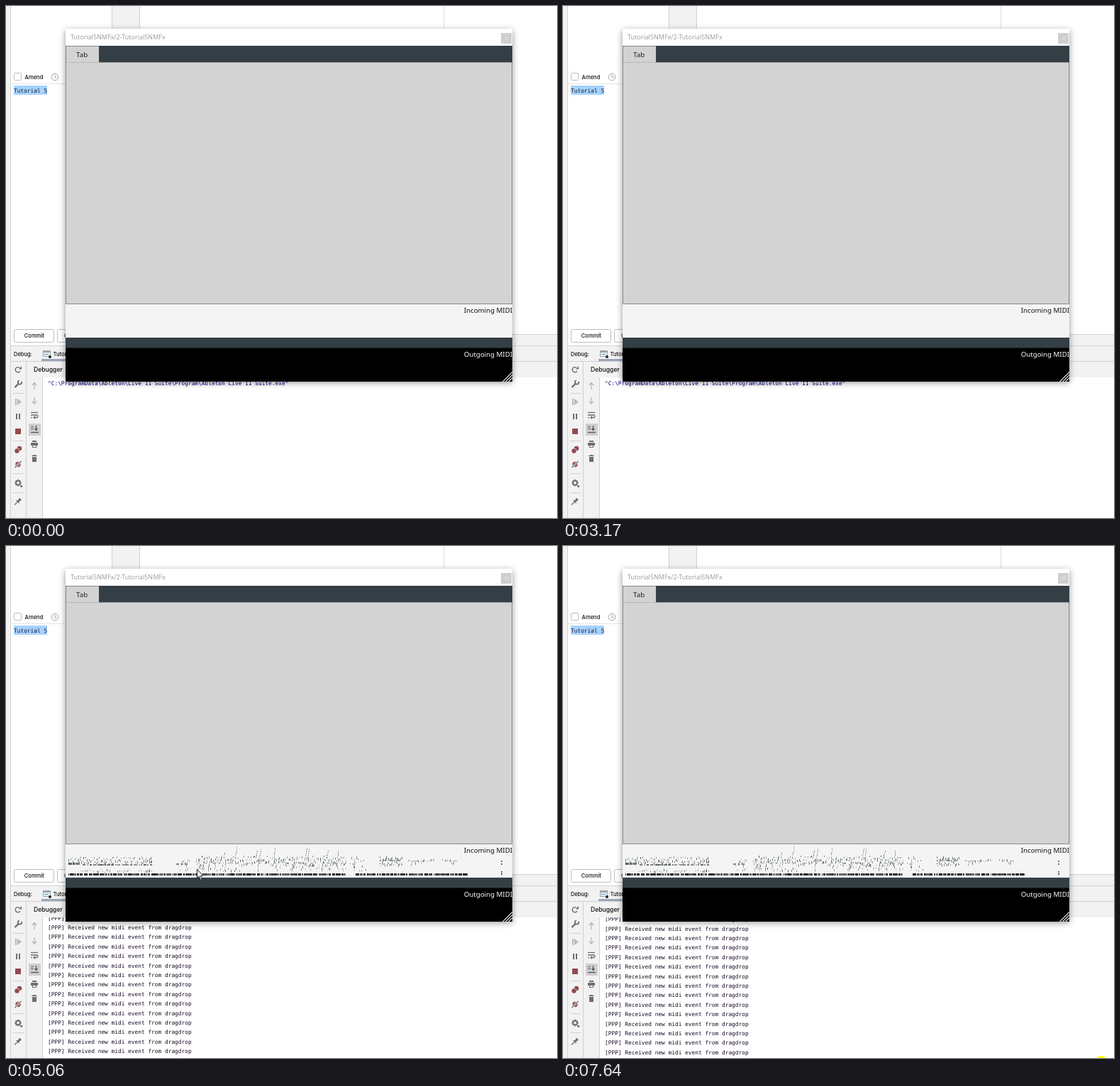
Animation, 777 px wide and 721 px high, one loop 7710 ms. Source, as an HTML page with a canvas:

```html
<!DOCTYPE html>
<html lang="en">
<head>
<meta charset="utf-8">
<title>MIDI drag and drop</title>
<style>
html, body { margin: 0; width: 100%; height: 100%; overflow: hidden; background: #fff; }
canvas { display: block; }
</style>
</head>
<body>
<canvas id="stage" width="777" height="721"></canvas>
<script>
const ctx = document.getElementById('stage').getContext('2d');
const W = 777, H = 721, LOOP = 7710;
const UI = 'Inter, sans-serif', MONO = '"DejaVu Sans Mono", monospace';
const PANEL = '#f2f2f2', RULE = '#d1d1d1', SLATE = '#333f44', ICON = '#6e6e6e', RED = '#914b4d';

function box(x, y, w, h, fill) {
  ctx.fillStyle = fill;
  ctx.fillRect(x, y, w, h);
}
function text(s, x, y, size, family, fill = '#111', align = 'left') {
  ctx.font = (family === UI ? '500 ' : '') + size + 'px ' + family;
  ctx.textAlign = align;
  ctx.fillStyle = fill;
  ctx.fillText(s, x, y);
}
// Open or closed polyline from a flat list of coordinates
function trace(p, close) {
  ctx.beginPath();
  for (let i = 0; i < p.length; i += 2) ctx.lineTo(p[i], p[i + 1]);
  if (close) ctx.closePath();
}
function line(p, color = ICON, width = 1.3) {
  trace(p);
  ctx.strokeStyle = color;
  ctx.lineWidth = width;
  ctx.stroke();
}
function poly(p, color) {
  trace(p, true);
  ctx.fillStyle = color;
  ctx.fill();
}
function disc(x, y, r, color) {
  ctx.beginPath();
  ctx.arc(x, y, r, 0, 7);
  ctx.fillStyle = color;
  ctx.fill();
}
function ring(x, y, r, color = ICON, width = 1.3, a = 0, b = Math.PI * 2) {
  ctx.beginPath();
  ctx.arc(x, y, r, a, b);
  ctx.strokeStyle = color;
  ctx.lineWidth = width;
  ctx.stroke();
}
function button(x, y, w, h, r) {
  ctx.beginPath();
  ctx.roundRect(x + .5, y + .5, w, h, r);
  ctx.fillStyle = '#fff';
  ctx.fill();
  ctx.strokeStyle = '#bdbdbd';
  ctx.lineWidth = 1;
  ctx.stroke();
}

function drawEditor() {
  box(0, 0, W, H, '#fff');
  box(0, 0, 6, H, PANEL);
  box(6, 0, 1, H, RULE);
  box(149, 0, 40, 60, PANEL);
  box(149, 0, 1, 60, RULE);
  box(188, 0, 1, 60, RULE);
  box(617, 0, 1, 60, '#dedede');

  button(11, 94, 10, 10, 1);
  text('Amend', 26.5, 102.7, 7.6, UI);
  ring(69, 100, 4.8, '#a3a3a3', 1);
  line([69, 97, 69, 100.5, 71.5, 100.5], '#a3a3a3', 1);
  box(7, 109, 90, 1, '#e4e4e4');
  box(11, 112, 47, 13, '#a6d2ff');
  text('Tutorial 5', 11, 122, 7.84, MONO, '#1a1a2c');
  button(11, 455, 56, 18, 2);
  text('Commit', 25.8, 467.2, 7.6, UI);
  button(72, 455, 56, 18, 2);
  text('C', 82, 467.2, 7.6, UI);

  box(700, 462, 77, 16, PANEL);
  box(700, 462, 77, 1, RULE);
  box(7, 478, 770, 45, PANEL);
  box(7, 478, 770, 1, RULE);
  box(7, 500, 770, 1, RULE);
  text('Debug:', 11, 492.7, 7.5, UI);
  box(50, 497, 70, 3, '#9ca7b8');
  box(52, 485, 11, 9, '#9aa7b0');
  box(53, 488, 9, 5, '#e4eef4');
  line([54, 490.5, 60, 490.5], '#6ba4c4', 1);
  disc(62, 494, 2, '#222');
  text('Tutorial5NMFx', 66.5, 492.7, 7.6, UI);

  box(7, 501, 45, 220, PANEL);
  text('Debugger', 39, 515.3, 8.6, UI);
  box(28, 501, 1, 220, RULE);
  box(51, 523, 1, 198, RULE);
  for (const y of [545, 612, 658, 685]) box(10, y, 15, 1, RULE);
  drawIcons();
}

function drawIcons() {
  // Run controls
  ring(16.8, 512.2, 3.6, ICON, 1.4, .6, 5.4);
  poly([18, 511.5, 22, 511.5, 22, 507], ICON);
  line([12.5, 537, 18, 531.5], ICON, 2.4);
  ring(19.5, 530, 2.7, ICON, 1.8, -.4, 4.4);
  box(13, 553, 2, 9, '#b9b9b9');
  poly([16, 553, 22, 557.5, 16, 562], '#b9b9b9');
  box(14, 574, 2, 8, ICON);
  box(18, 574, 2, 8, ICON);
  box(13, 595, 8, 8, RED);
  disc(19, 623, 3.3, RED);
  disc(15.5, 626.5, 3.8, PANEL);
  disc(15.5, 626.5, 3.2, RED);
  disc(17, 645.5, 3.7, RED);
  line([12, 650.5, 22, 640.5], PANEL, 2.6);
  line([12.5, 650, 21.5, 641], ICON, 1.2);
  for (let i = 0; i < 8; i++) {
    const a = i * Math.PI / 4, c = Math.cos(a), s = Math.sin(a);
    line([17 + 3 * c, 671.5 + 3 * s, 17 + 4.7 * c, 671.5 + 4.7 * s], ICON, 2);
  }
  ring(17, 671.5, 2.8, ICON, 1.8);
  poly([19.5, 675.5, 24, 675.5, 21.7, 678], '#444');
  line([12, 702.5, 16, 698.5], ICON, 1.3);
  poly([14, 696, 17, 696, 19, 692.5, 22, 695.5, 18.5, 698, 18.5, 701], ICON);

  // Console controls
  line([40, 540, 40, 530.5], '#b5b5b5');
  line([36.8, 534, 40, 530.5, 43.2, 534], '#b5b5b5');
  line([40, 551, 40, 560], '#b5b5b5');
  line([36.8, 556.8, 40, 560, 43.2, 556.8], '#b5b5b5');
  line([35, 572.5, 45, 572.5]);
  line([35, 576, 44, 576, 45, 577.5, 44, 579.5, 40, 579.5]);
  poly([41, 577, 41, 582, 38, 579.5], ICON);
  box(35, 579, 2, 1.3, ICON);
  box(32, 588, 17, 17, '#cfcfcf');
  line([35, 592.5, 39, 592.5]);
  line([35, 595.5, 39, 595.5]);
  line([42.5, 591, 42.5, 597], '#555');
  poly([40, 595, 45, 595, 42.5, 598.5], '#555');
  line([35, 600.5, 46, 600.5], '#555');
  box(37, 612, 6, 2, ICON);
  box(35, 615, 10, 4, ICON);
  box(37, 618, 6, 4, ICON);
  box(38, 619, 4, 2, PANEL);
  box(36, 633, 8, 1, ICON);
  box(38, 632, 4, 1, ICON);
  box(37, 635, 6, 7, ICON);
}

function drawConsole(t) {
  ctx.save();
  ctx.beginPath();
  ctx.rect(52, 523, W, H);
  ctx.clip();
  if (t < 4990) {
    text('"C:\\ProgramData\\Ableton\\Live 11 Suite\\Program\\Ableton Live 11 Suite.exe"',
      59, 533.8, 7.84, MONO, '#000080');
  } else {
    const top = t < 5200 ? 526.6 : 528.2;
    for (let i = 0; i < 16; i++)
      text('[PPP] Received new midi event from dragdrop', 59, top + i * 13.4, 7.84, MONO, '#1c0a24');
  }
  ctx.restore();
}

function random(seed) {
  return () => (seed = (seed * 16807) % 2147483647) / 2147483647;
}

// Notes sit on whole pixels: dashes in rows, upright ticks in bands, steep runs
function makeNotes() {
  const rnd = random(4711), list = [];
  const add = (x, y, w, h, a) =>
    list.push([Math.round(x), Math.round(y), Math.max(1, Math.round(w)), Math.max(1, Math.round(h)), a]);
  const row = (x0, x1, y, gap, h, a) => {
    for (let x = x0; x < x1;) {
      const w = Math.min(1 + rnd() * 5, x1 - x);
      add(x, y, w, h, a * (.6 + rnd() * .4));
      x += w + rnd() * gap;
    }
  };
  const band = (x0, x1, y0, y1, gap) => {
    for (let x = x0; x < x1; x += 1 + rnd() * gap)
      add(x, y0 + rnd() * (y1 - y0), 1, 1 + rnd() * 3, .2 + rnd() * .6);
  };
  const run = (x, y0, y1) => {
    for (let y = y0; y > y1; y -= 3, x += rnd()) add(x, y, 1, 2, .25 + rnd() * .5);
  };

  row(88, 480, 461, 1.5, 3, 1);
  row(493, 651, 461, 1.5, 3, 1);
  row(88, 104, 446, 2, 3, .9);
  row(108, 206, 448, 4, 2, .8);
  row(240, 258, 447, 5, 2, .7);
  row(280, 480, 446, 13, 1, .6);
  row(527, 558, 442, 4, 2, .6);
  row(567, 605, 443, 3, 1, .5);
  row(620, 635, 443, 4, 1, .5);
  for (const x of [105, 128, 157, 187]) band(x, x + 18, 455, 458, 2.5);
  band(88, 206, 437, 443, 3);
  band(88, 206, 442, 447, 2.5);
  band(243, 260, 440, 457, 1.5);
  band(268, 480, 436, 442, 3);
  band(268, 480, 441, 449, 2);
  band(268, 330, 450, 457, 5);
  band(380, 480, 448, 455, 3);
  band(485, 508, 437, 457, 1.5);
  band(527, 559, 437, 442, 1.8);
  band(527, 559, 443, 450, 1.6);
  band(567, 605, 440, 448, 4);
  band(615, 635, 440, 449, 3);
  for (const x of [253, 270, 277, 285, 308, 355, 403, 445, 490]) run(x, 456, 438);
  for (const x of [307, 323, 352, 357, 378, 422, 426, 452, 467]) run(x, 438, 422 + rnd() * 8);
  for (const y of [443, 447, 458, 461]) add(698, y, 2, 2, .7);
  return list;
}
const notes = makeNotes();

function drawWindow(t) {
  const active = t >= 940 && t < 3170;
  ctx.save();
  ctx.shadowColor = active ? 'rgba(0,0,0,.6)' : 'rgba(0,0,0,.42)';
  ctx.shadowBlur = active ? 13 : 9;
  ctx.shadowOffsetY = 1.5;
  box(84, 32, 630, 497, '#fff');
  ctx.restore();
  text('Tutorial5NMFx/2-Tutorial5NMFx', 91, 47.3, 9, '"Open Sans", sans-serif', active ? '#140818' : '#999');
  box(698, 38, 15, 15, active ? '#c75050' : '#cfcfcf');
  const x = active ? '#fff' : '#dcdcdc';
  line([703.5, 43, 708, 47.5], x, 1.2);
  line([708, 43, 703.5, 47.5], x, 1.2);

  const label = '"Noto Sans", sans-serif';
  box(84, 56, 630, 24, SLATE);
  box(84, 79.5, 630, 340.5, '#8c8c8c');
  box(85, 79.5, 628, 339.5, '#d3d3d3');
  box(84.5, 56.5, 46.5, 23, '#d3d3d3');
  text('Tab', 99, 72, 9.8, label, '#222');
  box(84, 420, 630, 47, '#f4f4f4');
  if (t >= 4790) {
    for (const [nx, ny, w, h, a] of notes) {
      ctx.globalAlpha = a;
      box(nx, ny, w, h, ny >= 461 ? '#10181c' : SLATE);
    }
    ctx.globalAlpha = 1;
  }
  box(84, 467, 630, 15, SLATE);
  box(84, 481.5, 630, 47.5, '#000');
  text('Incoming MIDI', 714, 432, 9.7, label, '#111', 'right');
  text('Outgoing MIDI', 714, 493.5, 9.7, label, '#fff', 'right');
  for (let i = 0; i < 3; i++) line([700.5 + i * 4, 529, 714, 515.5 + i * 4], '#d8d8d8', 1.2);
}

// Pointer moves: start, end, pictures shown, time it leaves, points
const moves = [
  [460, 670, 4, 940, [[649, 646], [617, 560], [556, 430], [516, 358]]],
  [940, 1640, 11, 1840, [[516, 358], [509, 342], [492, 310], [475, 281], [528, 238], [605, 209]]],
  [1840, 1910, 2, 3170, [[612, 194], [618, 184]]],
  [3630, 4390, 11, 6140, [[207, 32], [212, 110], [226, 245], [252, 385], [269, 455]]],
  [6140, 6900, 12, 6970, [[271, 457], [295, 472], [350, 525], [373, 580], [330, 608], [232, 621],
    [136, 625], [70, 633], [36, 639], [34, 640], [58, 647], [86, 651]]],
  [6970, 7040, 2, 7040, [[312, 714], [312, 714]]]
];

function spline(pts, u) {
  const s = u * (pts.length - 1), i = Math.min(Math.floor(s), pts.length - 2), f = s - i;
  const at = k => pts[Math.max(0, Math.min(pts.length - 1, k))];
  return [0, 1].map(k => {
    const a = at(i - 1)[k], b = at(i)[k], c = at(i + 1)[k], d = at(i + 2)[k];
    return b + .5 * f * (c - a + f * (2 * a - 5 * b + 4 * c - d + f * (3 * (b - c) + d - a)));
  });
}

function drawPointer(t) {
  const move = moves.find(m => t >= m[0] && t < m[3]);
  if (!move) return;
  const [start, end, count, , pts] = move, last = count - 1;
  const step = Math.min(last, Math.floor((t - start) / (end - start) * last + .1));
  const [x, y] = spline(pts, step / last).map(Math.round);
  ctx.save();
  ctx.translate(x + .5, y + .5);
  if (y > 529 && x > 52) {
    line([-2, -5, 2, -5], '#222', 1);
    line([0, -5, 0, 6], '#222', 1);
    line([-2, 6, 2, 6], '#222', 1);
  } else {
    const arrow = [0, 0, 0, 12, 2.8, 9.5, 5, 15, 7, 14, 4.8, 9, 8.5, 8.6];
    poly(arrow, '#fff');
    trace(arrow, true);
    ctx.strokeStyle = '#111';
    ctx.lineWidth = 1;
    ctx.stroke();
  }
  ctx.restore();
}

function draw(t) {
  drawEditor();
  drawConsole(t);
  drawWindow(t);
  drawPointer(t);
  if (t >= 7640) disc(759, 727.5, 9.5, '#ffff00');
}

const begin = performance.now();
function tick() {
  draw((performance.now() - begin) % LOOP);
  requestAnimationFrame(tick);
}
tick();
</script>
</body>
</html>
```
